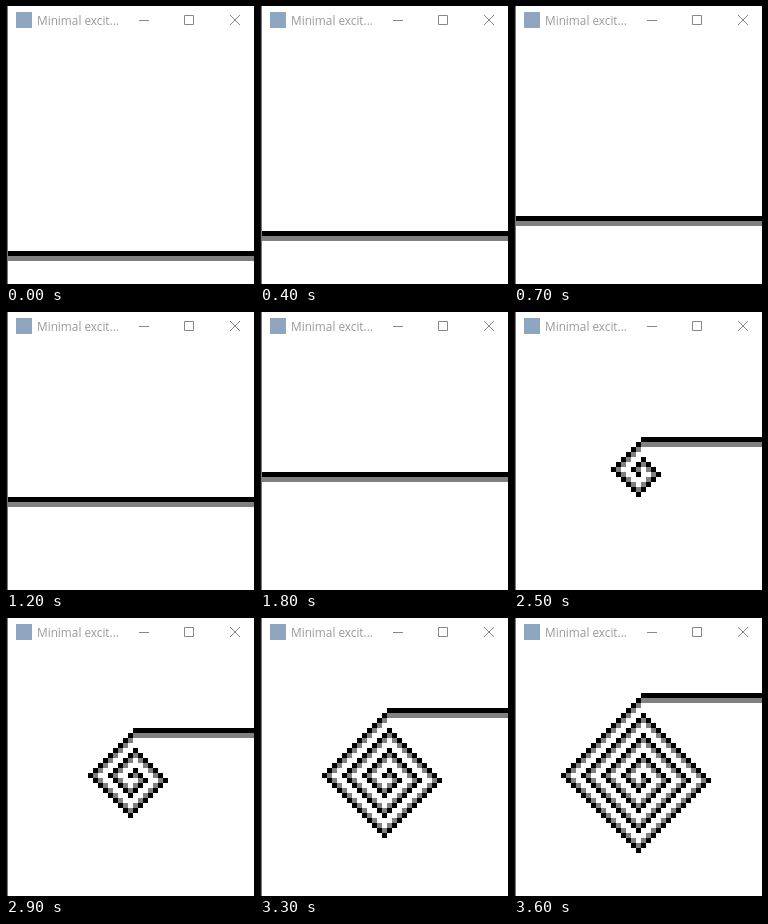
Animation, 248 px wide and 278 px high, one loop 3700 ms. Source, as an HTML page with a canvas:

```html
<!DOCTYPE html>
<html lang="en">
<head>
<meta charset="utf-8">
<title>Minimal excitable medium</title>
<style>
  html, body { margin: 0; width: 100%; height: 100%; overflow: hidden; background: #fff; }
  canvas { display: block; }
</style>
</head>
<body>
<canvas id="stage" width="248" height="278"></canvas>
<script>
const ctx = document.getElementById('stage').getContext('2d');
const CELL = 5, COLS = 50, ROWS = 56, LEFT = 2;
const REST = 0, REFRACTORY = 1, EXCITED = 2;
const COLORS = ['#fff', '#808080', '#000'];
const LAST_STEP = 34, CUT_STEP = 18, CUT_COL = 25;
const TICK = 100, TICKS = 37;

// Excited -> refractory -> rest; a resting cell fires beside an excited one.
function evolve(grid) {
  const excited = (r, c) => grid[r]?.[c] === EXCITED;
  return grid.map((row, r) => row.map((state, c) => {
    if (state !== REST) return state - 1;
    return excited(r - 1, c) || excited(r + 1, c) || excited(r, c - 1) || excited(r, c + 1)
      ? EXCITED : REST;
  }));
}

function simulate() {
  const first = Array.from({ length: ROWS }, (_, r) =>
    Array(COLS).fill(r === 49 ? EXCITED : r === 50 ? REFRACTORY : REST));
  const history = [first];
  for (let step = 1; step <= LAST_STEP; step++) {
    const grid = evolve(history[step - 1]);
    // Breaking the wave here leaves a free end that curls into a spiral.
    if (step === CUT_STEP) grid.forEach(row => row.fill(REST, 0, CUT_COL));
    history.push(grid);
  }
  return history;
}

// The display stalls for one tick at 13, 23 and 26, and catches up after 23.
const stepAt = tick => tick - (tick >= 13) - (tick === 23) - (tick >= 26);

function rect(color, x, y, w, h) {
  ctx.fillStyle = color;
  ctx.fillRect(x, y, w, h);
}

function drawWindow() {
  rect('#111', 0, 0, 1, 278);
  rect('#777', 1, 0, 1, 278);
  rect('#8ea6c0', 10, 6, 16, 16);

  ctx.fillStyle = '#999';
  ctx.font = '11.8px "Open Sans", "Noto Sans", sans-serif';
  ctx.fillText('Minimal excit...', 31, 19);

  ctx.strokeStyle = '#888';
  ctx.lineWidth = 1;
  ctx.beginPath();
  ctx.moveTo(133, 14.5);
  ctx.lineTo(143, 14.5);
  ctx.rect(178.5, 9.5, 9, 9);
  ctx.moveTo(224, 9);
  ctx.lineTo(234, 19);
  ctx.moveTo(234, 9);
  ctx.lineTo(224, 19);
  ctx.stroke();
}

const history = simulate();

function draw(now) {
  const tick = Math.floor(now / TICK) % TICKS;
  rect('#fff', 0, 0, 248, 278);
  history[stepAt(tick)].forEach((row, r) => row.forEach((state, c) => {
    if (state !== REST) rect(COLORS[state], LEFT + c * CELL, r * CELL, CELL, CELL);
  }));
  drawWindow();
  requestAnimationFrame(() => draw(performance.now()));
}
draw(0);
</script>
</body>
</html>
```
